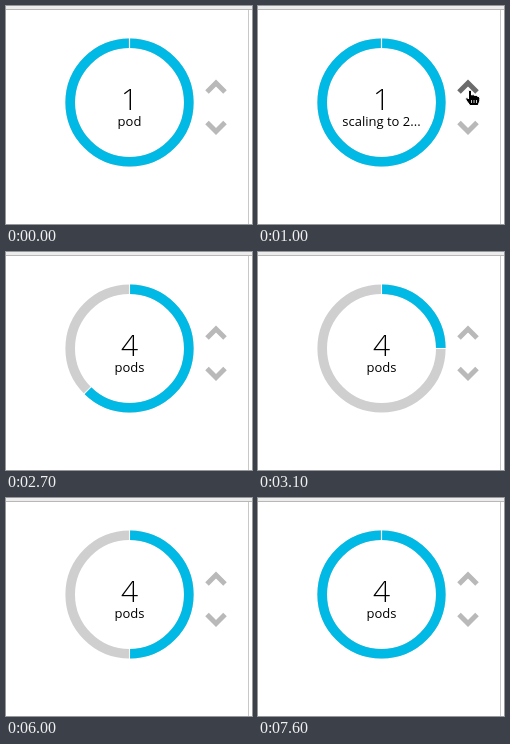
Write an HTML page that moves like this. It is 246 by 218 pixels and loops after 7.7 s.

```html
<!DOCTYPE html>
<html lang="en">
<head>
<meta charset="utf-8">
<title>Pod scaling</title>
<style>
  html, body { margin: 0; width: 100%; height: 100%; overflow: hidden; background: #fff; }
  svg { display: block; width: 246px; height: 218px; }
  text { font-family: "Open Sans", sans-serif; text-anchor: middle; fill: #000; }
  #count { font-size: 30px; font-weight: 300; }
  #label { font-size: 13px; }
  .ring { fill: none; stroke-width: 9.6; }
  .gap { stroke: #fff; stroke-width: 1.1; }
  .chevron { fill: none; stroke: #b9b9b9; stroke-width: 5; }
  .chevron.hover { stroke: #6c6c6c; }
  .cursor { fill: #000; stroke: #fff; stroke-width: 1; stroke-linejoin: round; }
</style>
</head>
<body>
<svg viewBox="0 0 246 218">
  <rect width="246" height="3" fill="#ececec"/>
  <rect y="3" width="246" height="1" fill="#b8b8b8"/>
  <rect x="242" y="4" width="1" height="214" fill="#c8c8c8"/>

  <g transform="translate(123.5 96.5) rotate(-90)">
    <circle class="ring" r="59.3" stroke="#cfcfcf"/>
    <circle class="ring" id="running" r="59.3" stroke="#00b9e4" pathLength="100"/>
    <path class="gap" d="M54 0H65"/>
    <path class="gap" id="edge" d="M54 0H65"/>
  </g>
  <text id="count" x="123.5" y="104"></text>
  <text id="label" x="123.5" y="120"></text>

  <path class="chevron" id="up" d="M201 86L210 77L219 86"/>
  <path class="chevron" d="M201 116.5L210 125.5L219 116.5"/>

  <g id="pointer">
    <path class="cursor" id="arrow" d="M0 0V16L3.7 12.6L6.3 18.8L9 17.6L6.4 11.6H11.5Z"/>
    <g id="hand">
      <path class="cursor" d="M-1.5 1Q0 -1 1.5 1V5Q3.5 4 4.5 5.5Q6.5 4.7 7.3 6.2Q9.8 6 9.8 8.5V11L8 15.5H0L-4 10Q-5 7.5-3 7.5L-1.5 9Z"/>
      <path d="M1.5 10V13M4 10V13M6.5 10V13" stroke="#fff" stroke-width=".8"/>
    </g>
  </g>
</svg>
<script>
const LOOP = 7700, STEP = 100;
const $ = id => document.getElementById(id);
const clamp = x => Math.min(1, Math.max(0, x));
const cubicInOut = x => x < .5 ? 4 * x ** 3 : 1 - 4 * (1 - x) ** 3;
const easeInOut = x => x * x * (3 - 2 * x);

// Share of running pods: [start, duration, target percent]
const shares = [[2500, 400, 25], [5590, 400, 50], [6698, 450, 100]];
const labels = [[0, 'pod'], [900, 'scaling to 2...'], [1200, 'scaling to 3...'],
  [1400, 'scaling to 4...'], [2500, 'pods']];
// Pointer stops: [time, x, y]
const stops = [[100, 2, 2], [800, 212, 84], [1500, 212, 84],
  [1600, 184, 76], [1700, 112, 40], [1800, 44, 6]];

function shareAt(t) {
  return shares.reduce((from, [start, time, to]) =>
    from + (to - from) * cubicInOut(clamp((t - start) / time)), 100);
}

function pointerAt(t) {
  const i = Math.max(1, stops.findIndex(s => s[0] >= t));
  const [t0, x0, y0] = stops[i - 1], [t1, x1, y1] = stops[i];
  const k = easeInOut(clamp((t - t0) / (t1 - t0)));
  return [x0 + (x1 - x0) * k, y0 + (y1 - y0) * k];
}

function show(id, visible) {
  $(id).style.display = visible ? '' : 'none';
}

function draw(t) {
  const share = shareAt(t);
  $('running').setAttribute('stroke-dasharray', share > 99.99 ? 'none' : `${share} 100`);
  $('edge').setAttribute('transform', `rotate(${share * 3.6})`);
  $('count').textContent = t < 2500 ? '1' : '4';
  $('label').textContent = labels.filter(l => l[0] <= t).pop()[1];

  const inside = t >= 100 && t <= 1800;
  show('pointer', inside);
  const [x, y] = pointerAt(Math.min(t, 1800));
  const hover = inside && x > 199 && x < 221 && y > 72 && y < 90;
  $('pointer').setAttribute('transform', `translate(${x} ${y})`);
  show('arrow', !hover);
  show('hand', hover);
  $('up').classList.toggle('hover', hover);
}

const begin = performance.now();
function tick() {
  const t = (performance.now() - begin) % LOOP;
  draw(Math.floor(t / STEP) * STEP);
  requestAnimationFrame(tick);
}
tick();
</script>
</body>
</html>
```
